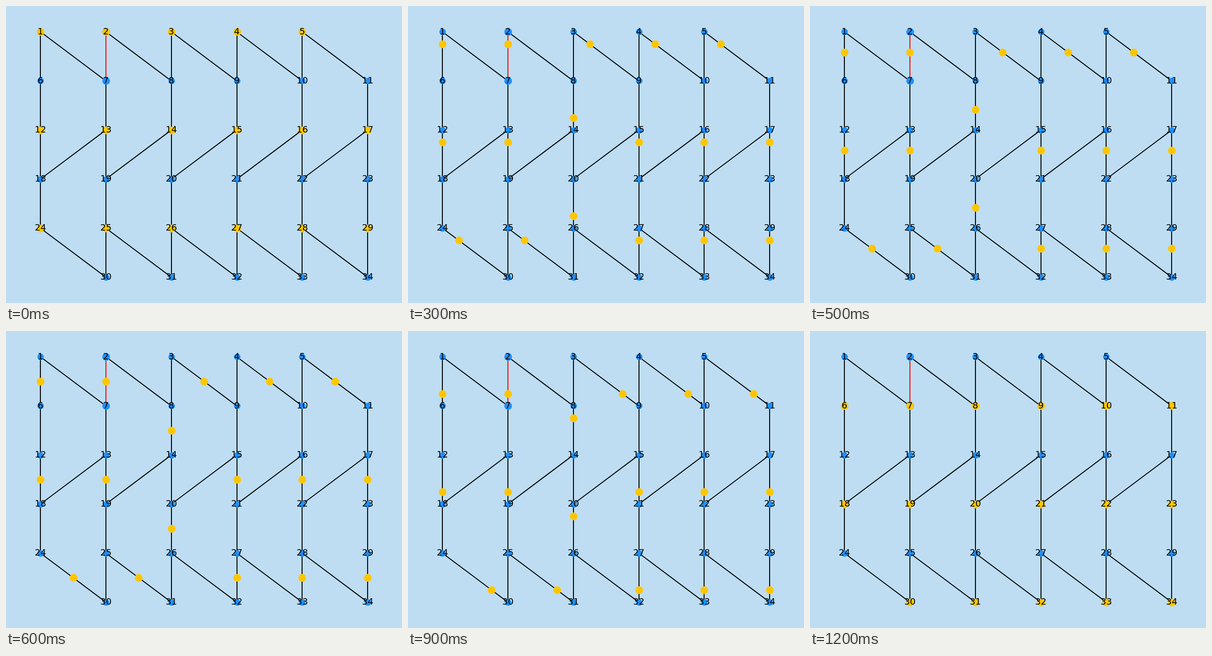
These frames come from a looping animation (864x648 px, 1300 ms). An HTML page:

```html
<!DOCTYPE html>
<html lang="en">
<head>
<meta charset="utf-8">
<title>Tokens moving on a graph</title>
<style>
  html, body { margin: 0; width: 100%; height: 100%; overflow: hidden; background: #beddf2; }
  svg { display: block; width: 864px; height: 648px; }
  line { stroke: #000; stroke-width: 2.08; stroke-linecap: square; }
  text { font: 19.44px "DejaVu Sans", sans-serif; text-anchor: middle; }
</style>
</head>
<body>
<svg id="stage" viewBox="0 0 864 648"></svg>
<script>
const BLUE = '#1e90ff', YELLOW = '#ffc600';
const STEP_MS = 100, STEPS = 12;
const stage = document.getElementById('stage');

function add(tag, attrs, text = '') {
  const el = document.createElementNS('http://www.w3.org/2000/svg', tag);
  for (const key in attrs) el.setAttribute(key, attrs[key]);
  el.textContent = text;
  stage.appendChild(el);
  return el;
}

// Markers sit on pixel centres.
const snap = v => Math.round(v) + 0.5;

// Nodes are numbered row by row; each row is [first column, last column].
const nodes = [null];
[[0, 4], [0, 5], [0, 5], [0, 5], [0, 5], [1, 5]].forEach(([first, last], row) => {
  for (let col = first; col <= last; col++) {
    nodes.push({ row, col, x: 75.2 + 142.8 * col, y: 56.4 + 107.08 * row });
  }
});
const nodeAt = (row, col) => nodes.find(n => n && n.row === row && n.col === col);

function addEdge(a, b, color) {
  if (!a || !b) return;
  const upright = a.col === b.col;
  const px = v => upright ? Math.round(v) : v;
  add('line', { x1: px(a.x), y1: px(a.y), x2: px(b.x), y2: px(b.y), style: `stroke:${color}` });
}

// Sideways shift of the diagonal leaving each row.
const slant = [1, null, -1, null, 1];
nodes.slice(1).forEach(node => {
  const { row, col } = node;
  addEdge(node, nodeAt(row + 1, col), row === 0 && col === 1 ? '#f00' : '#000');
  if (slant[row]) addEdge(node, nodeAt(row + 1, col + slant[row]), '#000');
});

nodes.slice(1).forEach((n, i) => {
  const marked = i === 1 || i === 6;
  add('circle', { cx: snap(n.x), cy: snap(n.y), r: marked ? 8.4 : 7.1, fill: BLUE });
});

const routes = [
  [1, 6], [2, 7], [3, 9], [4, 10], [5, 11],
  [12, 18], [13, 19], [14, 8], [15, 21], [16, 22], [17, 23],
  [24, 30], [25, 31], [26, 20], [27, 32], [28, 33], [29, 34]
];
const tokens = routes.map(([from, to]) => ({
  from: nodes[from],
  to: nodes[to],
  el: add('circle', { r: 8.4, fill: YELLOW })
}));

nodes.slice(1).forEach((n, i) => add('text', { x: n.x, y: Math.round(n.y + 5.5) }, i + 1));

function render(time) {
  const p = Math.floor(time / STEP_MS) % (STEPS + 1) / STEPS;
  for (const { from, to, el } of tokens) {
    el.setAttribute('cx', snap(from.x + (to.x - from.x) * p));
    el.setAttribute('cy', snap(from.y + (to.y - from.y) * p));
  }
}

let start;
function tick(now) {
  start ??= now;
  render(now - start);
  requestAnimationFrame(tick);
}
render(0);
requestAnimationFrame(tick);
</script>
</body>
</html>
```
